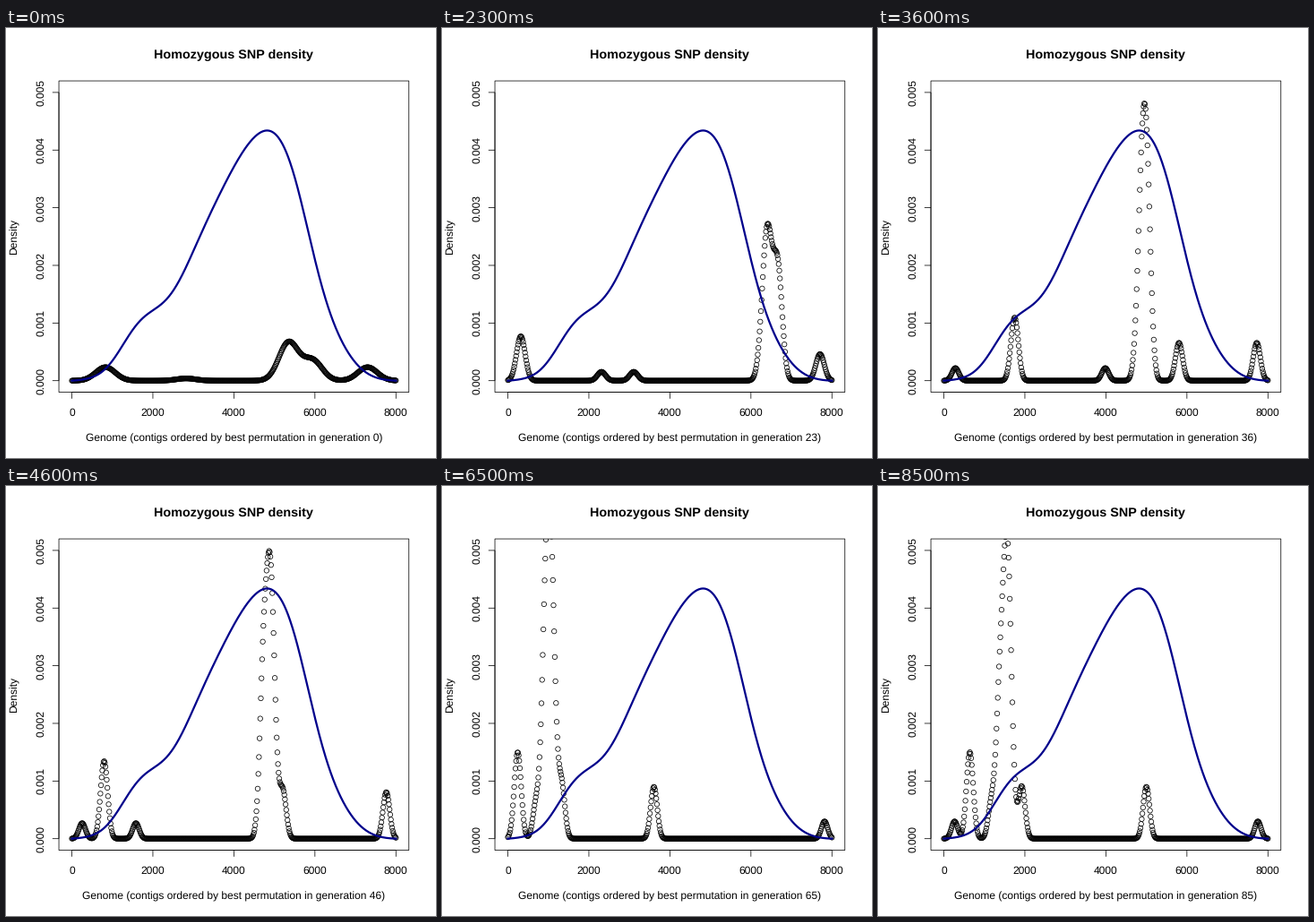
These frames come from a looping animation (480x480 px, 8.6 s). A matplotlib script:

```python
import numpy as np
import matplotlib as mpl
import matplotlib.pyplot as plt
from matplotlib.animation import FuncAnimation
from matplotlib.patches import Rectangle

mpl.rcParams["font.family"] = "Liberation Sans"
mpl.rcParams["text.hinting"] = "no_hinting"

SIZE, DPI = 480, 72
FRAMES, STEP = 86, 100
LEFT, RIGHT, TOP, BOTTOM = 59.04, 449.76, 59.04, 406.56
X0, X1 = 73.51, 435.29      # 0 and 8000 on the x axis
Y0, Y1 = 393.69, 71.91      # 0 and 0.005 on the y axis
THIN = 0.75

# SNPs carried by each contig, and where the contigs lie at some generations
COUNTS = np.array([17, 7, 5, 3, 3, 2, 1, 1])
PLACES = {
    0: [5350, 5940, 830, 7300, 7300, 5940, 830, 2820],
    11: [6358, 6734, 420, 7618, 785, 6734, 3107, 2366],
    23: [6402, 6667, 320, 7706, 6667, 6667, 3107, 2311],
    31: [4910, 5186, 2222, 7706, 6103, 5186, 5186, 300],
    46: [4900, 4720, 796, 7762, 5208, 4720, 1581, 254],
    65: [1050, 907, 243, 3605, 1327, 697, 907, 7817],
    81: [1560, 1371, 641, 4998, 1924, 1172, 265, 7751],
}
GENS = list(PLACES)

# the blue curve in thousandths, at every 500 on the x axis
CURVE = [0, .06, .345, .88, 1.22, 1.56, 2.25, 3.02, 3.71,
         4.22, 4.29, 3.53, 2.10, .94, .314, .057, 0]

grid = np.linspace(0, 8000, 512)


def px(x):
    return X0 + (X1 - X0) * np.asarray(x) / 8000


def py(d):
    """Pixel row of a density given in thousandths."""
    return Y0 + (Y1 - Y0) * np.asarray(d) / 5


def bells(x, mid, width):
    return np.exp(-((x[:, None] - mid) / width) ** 2 / 2)


def smooth_curve(x):
    """Sum of bells that passes through the curve heights."""
    mid = np.linspace(0, 8000, len(CURVE))
    return bells(x, mid, 500) @ np.linalg.solve(bells(mid, mid, 500), CURVE)


def places(gen):
    """Contigs hop about every five generations towards the next order."""
    gen = min(gen, GENS[-1])
    k = min(np.searchsorted(GENS, gen, side="right"), len(GENS) - 1)
    a, b = GENS[k - 1], GENS[k]
    hops = max(2, round((b - a) / 5))
    u = (gen - a) * hops // (b - a) / hops
    return (1 - u) * np.array(PLACES[a]) + u * np.array(PLACES[b])


def density(gen):
    """Every SNP adds one bell; bells grow taller and narrower."""
    height = min(0.039 + 0.005 * gen, 0.3)
    floor = 76 + 1.7 * COUNTS
    width = floor + (240 - floor) * np.exp(-gen / 12)
    return bells(grid, places(gen), width) @ COUNTS * height


fig = plt.figure(figsize=(SIZE / DPI, SIZE / DPI), dpi=DPI, facecolor="white")
ax = fig.add_axes([0, 0, 1, 1])
ax.set_xlim(0, SIZE)
ax.set_ylim(SIZE, 0)
ax.axis("off")


def line(xs, ys):
    ax.plot(xs, ys, color="black", lw=THIN, solid_capstyle="butt", snap=False)


def label(x, y, s, **kw):
    style = dict(size=12, ha="center", va="baseline", rotation_mode="anchor")
    return ax.text(x, y, s, **(style | kw))


frame = Rectangle((LEFT, TOP), RIGHT - LEFT, BOTTOM - TOP,
                  fill=False, ec="black", lw=THIN, snap=False)
ax.add_patch(frame)

line([X0, X1], [BOTTOM, BOTTOM])
line([LEFT, LEFT], [Y0, Y1])
for v in range(0, 8001, 2000):
    line([px(v)] * 2, [BOTTOM, BOTTOM + 7.2])
    label(px(v), 432.5, str(v))
for v in range(6):
    line([LEFT - 7.2, LEFT], [py(v)] * 2)
    label(42.2, py(v), f"0.00{v}", rotation=90)

mid_x, mid_y = (LEFT + RIGHT) / 2, (TOP + BOTTOM) / 2
label(mid_x, 34.4, "Homozygous SNP density", size=14.4, weight="bold")
label(13, mid_y, "Density", rotation=90)
caption = label(mid_x, 462, "")

cols = px(grid)
dots = ax.scatter(cols, np.full(grid.size, Y0), s=np.full(grid.size, 5.4 ** 2),
                  facecolors="none", edgecolors="black", linewidths=THIN, zorder=2.5)
dots.set_clip_path(frame)
ax.plot(cols, py(smooth_curve(grid)), color="#00008b", lw=2.25, zorder=3)


def draw(i):
    dots.set_offsets(np.column_stack([cols, py(density(i))]))
    caption.set_text(f"Genome (contigs ordered by best permutation in generation {i})")
    return dots, caption


anim = FuncAnimation(fig, draw, frames=FRAMES, interval=STEP,
                     repeat=True, repeat_delay=0)
plt.show()
```
